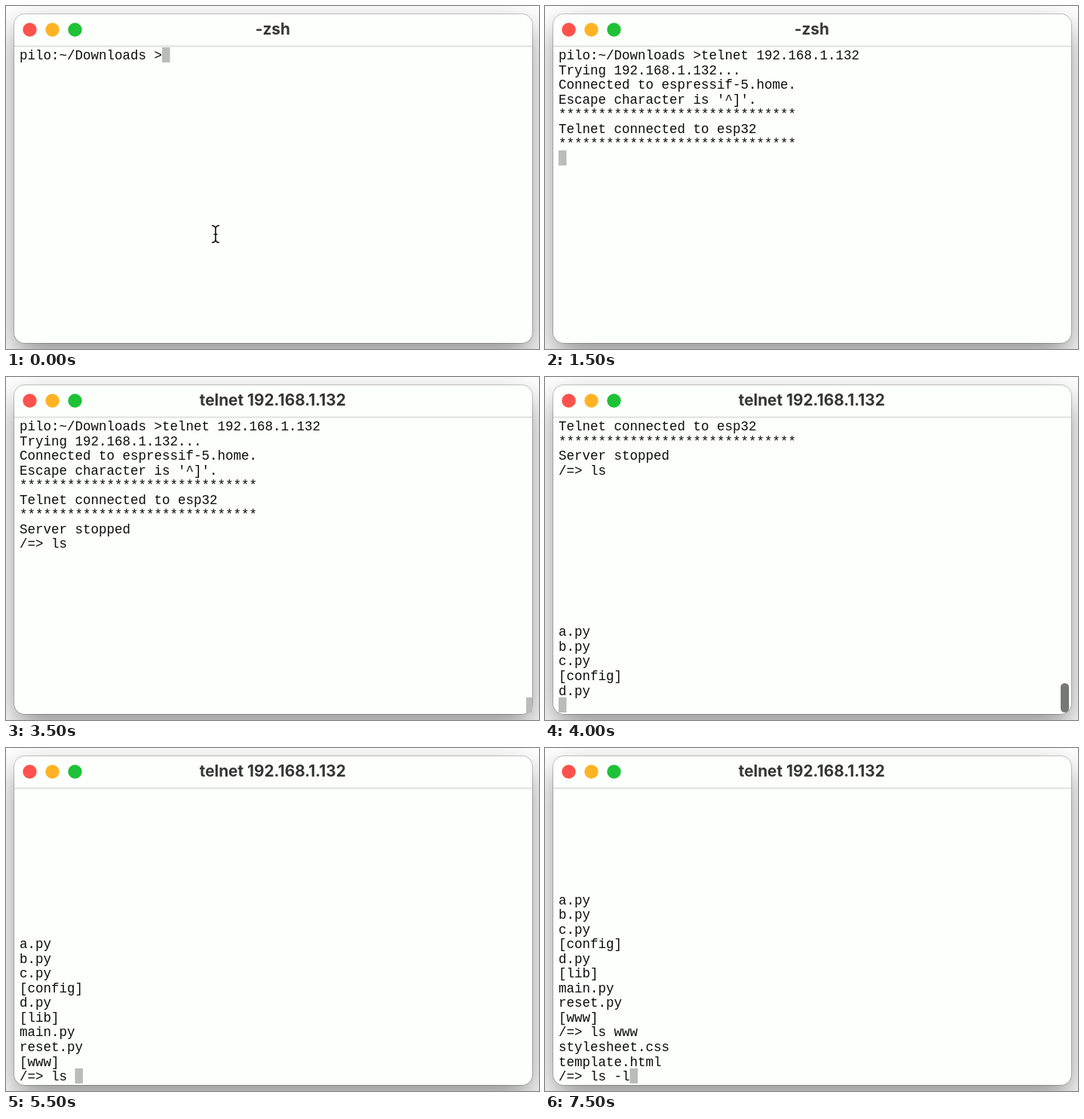
Write an HTML page that moves like this. It is 707 by 456 pixels and loops after 8 s.

```html
<!DOCTYPE html>
<html lang="en">
<head>
<meta charset="utf-8">
<title>Terminal session</title>
<style>
  html, body { margin: 0; width: 100%; height: 100%; overflow: hidden; background: #fff; }
  #window {
    position: absolute; left: 11px; top: 11px; width: 687px; height: 437px;
    border-radius: 14px; background: #fdfffc;
    box-shadow: 0 0 0 1px rgba(0, 0, 0, .2), 0 18px 40px rgba(0, 0, 0, .43);
  }
  svg { position: absolute; left: 0; top: 0; display: block; }
  #title { font: 700 20.8px Inter, sans-serif; fill: #363636; text-anchor: middle; }
  #rows text { font: 17.5px "Liberation Mono", monospace; fill: #0c0c0c; white-space: pre; }
</style>
</head>
<body>
<div id="window"></div>
<svg width="707" height="456" viewBox="0 0 707 456">
  <rect x="11" y="52.5" width="687" height="2" fill="#dfe1df"/>
  <circle cx="31.5" cy="31.5" r="9.2" fill="#ff524c"/>
  <circle cx="61.5" cy="31.5" r="9.2" fill="#ffb324"/>
  <circle cx="91.5" cy="31.5" r="9.2" fill="#1dc236"/>
  <text id="title" x="353.8" y="37.5"></text>
  <rect id="cursor" height="20" fill="#babcba"/>
  <g id="rows"></g>
  <rect id="scrollbar" x="684" y="407" width="11" height="39" rx="5.5" fill="#767876"/>
  <path id="pointer" fill="none" stroke="#111" stroke-width="1.6"
    d="M273 292q5 0 5 4.5v13.5q0 4.5-5 4.5M283 292q-5 0-5 4.5v13.5q0 4.5 5 4.5M275.5 303.5h5"/>
</svg>
<script>
const LOOP = 8000, ROWS = 20;
const LEFT = 18, TOP = 55, CELL = 10.5, PITCH = 19.53, BASELINE = 16, RIGHT = 698;
const stars = '*'.repeat(30);

const log = [
  'pilo:~/Downloads >telnet 192.168.1.132',
  'Trying 192.168.1.132...',
  'Connected to espressif-5.home.',
  "Escape character is '^]'.",
  stars, 'Telnet connected to esp32', stars,
  'Server stopped',
  '/=> ls',
  ...Array(10).fill(''),
  'a.py', 'b.py', 'c.py', '[config]', 'd.py', '[lib]', 'main.py', 'reset.py', '[www]',
  '/=> ls www',
  'stylesheet.css', 'template.html',
  '/=> ls -l'
];

// Each step shows the log up to a line and column.
const steps = [
  { at: 0, line: 0, col: 18 },
  { at: 500, line: 0, col: 18, blink: true },
  { at: 1000, line: 0, col: 38 },
  { at: 1500, line: 7, col: 0 },
  { at: 2500, line: 8, col: 0 },
  { at: 3000, line: 8, col: 4 },
  { at: 3500, line: 8, col: 6, cursor: [19, 64] },  // screen-size probe
  { at: 4000, line: 24, col: 0 },
  { at: 4500, line: 28, col: 4 },
  { at: 5000, line: 28, col: 4, blink: true },
  { at: 5500, line: 28, col: 7 },
  { at: 6000, line: 28, col: 10 },
  { at: 6500, line: 31, col: 4 },
  { at: 7000, line: 31, col: 7 },
  { at: 7500, line: 31, col: 9 }
];

const $ = id => document.getElementById(id);
const show = (id, on) => $(id).setAttribute('visibility', on ? 'visible' : 'hidden');
const rowTop = i => Math.round(TOP + i * PITCH);

const rows = Array.from({ length: ROWS }, (_, i) => {
  const row = document.createElementNS('http://www.w3.org/2000/svg', 'text');
  row.setAttribute('x', LEFT);
  row.setAttribute('y', rowTop(i) + BASELINE);
  return $('rows').appendChild(row);
});

function visibleText(line, step) {
  if (line > step.line) return '';
  return line === step.line ? log[line].slice(0, step.col) : log[line];
}

function render(time) {
  const step = steps.filter(s => s.at <= time).pop();
  const scroll = Math.max(0, step.line - ROWS + 1);
  rows.forEach((row, i) => { row.textContent = visibleText(i + scroll, step); });

  const [line, col] = step.cursor || [step.line - scroll, step.col];
  const x = LEFT + col * CELL;
  $('cursor').setAttribute('x', x);
  $('cursor').setAttribute('y', rowTop(line));
  $('cursor').setAttribute('width', Math.min(CELL, RIGHT - x));

  show('cursor', !step.blink);
  show('pointer', time < 500);
  show('scrollbar', time >= 4000 && time < 4500);
  $('title').textContent = time < 2000 ? '-zsh' : 'telnet 192.168.1.132';
}

const start = performance.now();
function frame() {
  render((performance.now() - start) % LOOP);
  requestAnimationFrame(frame);
}
frame();
</script>
</body>
</html>
```
